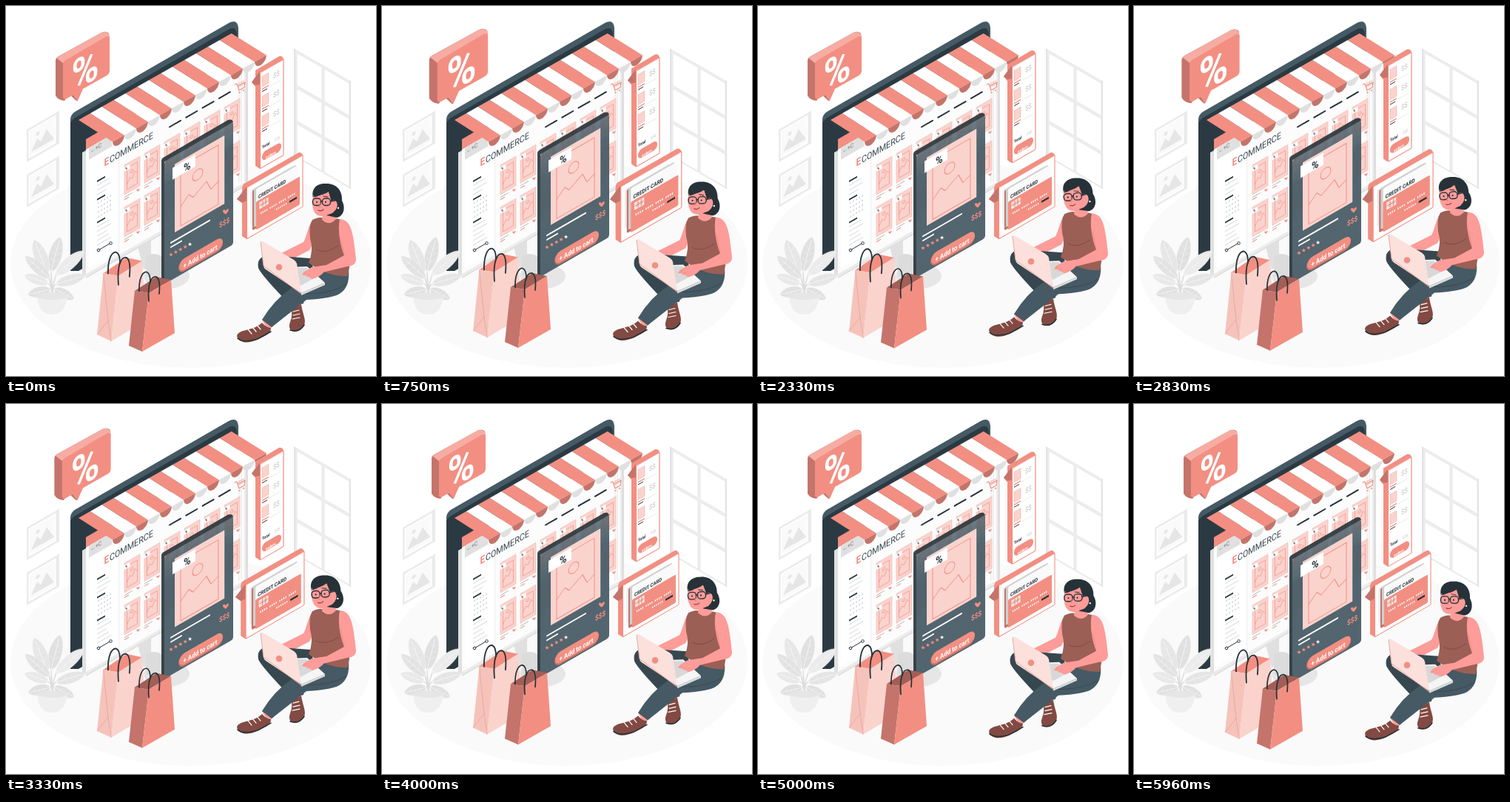
An HTML page for the animation above (6000 ms loop, 500 by 500 pixels).

```html
<!DOCTYPE html>
<html lang="en">
<head>
<meta charset="utf-8">
<title>Online shop</title>
<style>
html, body { margin: 0; width: 100%; height: 100%; overflow: hidden; background: #fff; }
svg { display: block; width: 100%; height: 100%; }
text { font-family: Roboto, Arial, sans-serif; }
</style>
</head>
<body>
<svg id="stage" viewBox="0 0 500 500"></svg>
<script>
const coral = '#f28f82', deep = '#c4746b', blush = '#f7aca3', pink = '#fad3cd', dark = '#263238', slate = '#455a64', skin = '#fd9c99', brown = '#9b5f55';

// Markup helpers
const rep = (n, f) => Array.from({length: n}, (_, i) => f(i)).join('');
const path = (d, fill, more = '') => `<path d="${d}" fill="${fill}" ${more}/>`;
const line = (d, stroke, w = 1) => path(d, 'none', `stroke="${stroke}" stroke-width="${w}" stroke-linecap="round" stroke-linejoin="round"`);
const rect = (x, y, w, h, fill, more = '') => `<rect x="${x}" y="${y}" width="${w}" height="${h}" fill="${fill}" ${more}/>`;
const dot = (x, y, r, fill, more = '') => `<circle cx="${x}" cy="${y}" r="${r}" fill="${fill}" ${more}/>`;
const group = (id, body) => `<g id="${id}">${body}</g>`;
// Isometric wall: x stays in screen pixels and the wall climbs to the right
const wall = (x, y, body) => `<g transform="matrix(1 -.577 0 1 ${x} ${y})">${body}</g>`;
const label = (x, y, size, fill, str, more = '') =>
  `<text transform="matrix(.866 -.5 0 1 ${x} ${y})" font-size="${size}" fill="${fill}" ${more}>${str}</text>`;
const heart = (x, y, s, fill) => path(`M${x},${y + s}C${x - 2 * s},${y} ${x - s},${y - 1.6 * s} ${x},${y - .4 * s}C${x + s},${y - 2 * s} ${x + 2 * s},${y - s} ${x},${y + s}`, fill);
const bold = 'font-weight="700"';

function star(x, y, r, fill) {
  const pts = rep(10, i => {
    const a = i * Math.PI / 5, d = i % 2 ? r * .42 : r;
    return `${(x + d * Math.sin(a)).toFixed(1)},${(y - d * Math.cos(a)).toFixed(1)} `;
  });
  return `<polygon points="${pts}" fill="${fill}"/>`;
}

// Leaf with its stem rising from the pot
function leaf(x, y, tx, ty, w, fill) {
  const dx = tx - x, dy = ty - y, n = Math.hypot(dx, dy), nx = -dy / n * w, ny = dx / n * w;
  const at = (k, s) => `${x + dx * k + s * nx},${y + dy * k + s * ny}`;
  return line(`M63,390Q62,378 ${x},${y}`, '#dcdcdc', 1.4)
    + path(`M${x},${y}C${at(.1, 1)} ${at(.8, 1.1)} ${tx},${ty}C${at(.8, -1.1)} ${at(.1, -1)} ${x},${y}`, fill, 'stroke="#f4f4f4" stroke-width=".6"')
    + line(`M${x},${y}L${at(.9, 0)}`, '#f7f7f7', .9)
    + rep(3, i => line(`M${at(.38 + i * .18, .5)}L${at(.28 + i * .18, 0)}L${at(.38 + i * .18, -.5)}`, '#f2f2f2', .6));
}

const frame = y => wall(28, y, rect(0, 0, 43, 44, '#ebebeb') + rect(2.5, 3, 37, 38, '#fff') + rect(4, 5, 34, 34, '#fafafa')
  + path('M6,34L14,20l5,7L27,15l10,19z', '#e6e6e6') + dot(15, 14, 2.6, '#e6e6e6')) + line(`M71,${y - 25}v44`, '#e0e0e0', 1);

const room = `<ellipse cx="250" cy="348.5" rx="244" ry="140.5" fill="#fafafa"/>`
  + `<g transform="matrix(1 .577 0 1 389 57)">${rect(0, 0, 77, 146, '#ededed') + rect(0, 0, 2, 146, '#e2e2e2') + rect(75.5, 0, 1.5, 146, '#e2e2e2')
    + rep(6, i => rect(4 + (i % 2) * 37, 4 + (i >> 1) * 48, 34, 44, '#fff', 'stroke="#e6e6e6" stroke-width=".8"'))}</g>`
  + frame(167) + frame(228);

const plant = leaf(61, 359, 73, 312, 11, '#e0e0e0') + leaf(56, 361, 38, 316, 11, '#e6e6e6')
  + leaf(59, 368, 26, 338, 9, '#e2e2e2') + leaf(68, 363, 105, 331, 10, '#ebebeb')
  + leaf(57, 375, 25, 364, 8, '#e8e8e8') + leaf(68, 376, 107, 364, 9, '#e4e4e4')
  + leaf(60, 383, 30, 390, 9, '#e0e0e0') + leaf(65, 382, 92, 396, 8, '#e0e0e0')
  + path('M42,392q2,25 20,25t21,-25z', '#efefef') + `<ellipse cx="62.5" cy="392" rx="20.5" ry="5" fill="#e6e6e6"/>`;

// Monitor with the shop page
const product = (x, y) => wall(x, y, rect(0, 0, 21, 40, pink, 'stroke="#f5b5ac" stroke-width=".5"')
  + rect(3.5, 6, 14, 29, 'none', `stroke="${coral}" stroke-width=".6"`)
  + path('M3.5,28l4,-7 3,3 4,-8 3,5', 'none', `stroke="${coral}" stroke-width=".6"`) + dot(10, 14, 2, 'none', `stroke="${coral}" stroke-width=".6"`)
  + rect(-.5, 3, 8, 6, '#fff') + rect(0, 43, 11, 1.2, '#bdbdbd') + rect(0, 46, 6, 1.2, coral))
  + label(x + 1, y + 7, 5, dark, '%', bold) + heart(x + 18.5, y + 34, 1.8, coral);

const stand = `<ellipse cx="217" cy="365" rx="31" ry="17" fill="#e6e6e6"/>`
  + path('M176,318L196,306V352L186,356Z', '#e0e0e0') + path('M188,340Q200,330 212,340V366H190Z', '#dcdcdc');

// Sidebar rows: headings are short and dark, the middle rows are dotted ratings
const sidebar = rep(15, i => {
  const head = [0, 4, 9].includes(i);
  if (i > 4 && i < 9) return rep(5, k => dot(2 + k * 4, i * 6.2, 1, '#d0d0d0'));
  return rect(0, i * 6.2, head ? 11 : 13 + i % 3 * 3, head ? 2 : 1, head ? dark : '#d6d6d6');
});

const monitor = path('M87,358V154Q87,147 93,143L301,23Q313,17 314,30V237Z', slate)
  + path('M87,358V159Q88,154 95,150L302,31Q311,27 312,38V236L98,358Z', '#2b3a42')
  + wall(103, 190, rect(0, 8, 8, 169, '#e0e0e0'))
  + wall(108, 186, rect(0, 0, 219, 182, '#dedede') + rect(0, 0, 216, 180, '#ececec') + rect(0, 0, 214, 176, '#fcfcfc')
    + rect(4, 18, 40, 152, '#fff') + rect(44, 18, .8, 154, '#ebebeb')
    + line('M207,20V172M210,20V172', '#e2e2e2', .7) + rect(0, -6, 32, 14, coral) + rect(4, 8, 31, 16, '#e0e0e0'))
  + label(114, 199, 8, '#757575', '←+C')
  + label(132.5, 217, 14, coral, 'E', bold) + label(140, 212.5, 12.4, '#37474f', 'COMMERCE')
  + rep(4, i => line(`M${221 + 22.3 * i},${163.5 - 12.9 * i}l15,-8.6`, dark, 2))
  + line('M309,106l3,-1 3,9 7,-4 1,-7 -10,5', coral, 1.2) + line('M314,105l8,-4M315,109l7,-4', coral, .7) + dot(315.5, 117, 1.1, coral) + dot(321, 114, 1.1, coral)
  + wall(123, 236, sidebar)
  + line('M125,330l17,-10', dark, 1) + dot(125, 330, 1.8, '#fff', `stroke="${dark}"`) + dot(141.5, 320.5, 1.8, '#fff', `stroke="${dark}"`)
  + rep(12, i => product(160 + 27 * (i % 6), 215 - 15.6 * (i % 6) + (i > 5 ? 57 : 0)));

const awning = rep(13, i => {
  const top = [98 + 15.9 * i, 154 - 9 * i], low = [144 + 16 * i, 183.5 - 9 * i];
  return path(`M${top}l15.9,-9L${low[0] + 16},${low[1] - 9}L${low}z`, i % 2 ? '#fff' : coral)
    + path(`M${low}c1,12 15,3 16,-9z`, i % 2 ? '#e0e0e0' : deep);
});

const phone = '<linearGradient id="glass" x2="0" y2="1"><stop stop-color="#4a5d67" stop-opacity=".8"/><stop offset=".2" stop-color="#4a5d67" stop-opacity=".95"/></linearGradient>'
  + path('M210,209Q210,206 214,204L300,154Q306,152 307,157L214,210.5V376L210,373Z', dark, 'opacity=".9"')
  + wall(214, 210, rect(0, 0, 93, 166, 'url(#glass)', 'rx="3"')
    + rect(14, 12, 67, 92, pink) + path('M14,12h67v92', 'none', 'stroke="#fff" stroke-opacity=".5" stroke-width=".6"')
    + rect(22, 20, 51, 80, 'none', `stroke="${coral}"`) + dot(45, 44, 7, 'none', `stroke="${coral}"`)
    + line('M22,74L33,64L39,71L57,60L63,74L73,69', coral, 1)
    + rect(11, 15, 31, 16, '#fff') + rect(8, 114, 54, 2.2, '#fff', 'rx="1"') + rect(8, 120, 16, 2, '#fff', 'rx="1"')
    + rect(19, 147, 60, 17, deep, 'rx="8.5"') + rect(20, 146.5, 59, 15.5, coral, 'rx="7.7"'))
  + label(240, 225, 15, dark, '%', bold) + heart(297, 278, 3.4, coral) + label(288, 300, 9.5, coral, '$$$', bold)
  + rep(5, i => star(223 + 6.4 * i, 336 - 3.5 * i, 2.9, i < 4 ? coral : '#f5f5f5'))
  + label(239.5, 355, 9.2, '#fff', '+ Add to cart', bold);

const bag = (x, y, front, side, inner) => `<g transform="translate(${x} ${y})">`
  + path('M8,27L37,8L57,12L27,30Z', inner) + line('M14,30C13,9 19,1 24,1.5Q29,3 29,15', dark, 1.7)
  + path('M8,27L27,30L18,109L0,101Z', side) + path('M27,30L57,12L62,84L18,109Z', front)
  + line('M18,109L14,84L8,27M14,84L0,101', deep, .3)
  + line('M27,41C25,15 31,7 37,8Q43,11 41,31', dark, 1.7) + '</g>';
const bags = `<g transform="translate(123 331)scale(1.07 1.12)translate(-123 -331)">${bag(123, 331, pink, '#f6c3bb', coral)}</g>` + bag(166, 358, coral, deep, '#a35e56');

const offer = path('M67,74Q67,70 71,68L129,36Q135,33 139,37L140,44L79,128Q70,127 67,121Z', deep)
  + path('M68,70L129,36Q135,33 139,38L140,46L78,78Z', blush)
  + path('M77,79Q77,75 81,73L134,42Q140,39 140,46V87Q140,92 136,94L104,112L97,128L91,120L82,125Q77,128 77,122Z', coral)
  + path('M97,128L91,120L88,121.5L95,128Z', deep)
  + label(107, 106.5, 58, '#fff', '%', bold + ' text-anchor="middle"');

const basket = path('M337,87L369,68Q374,67 375,72L343,90V220L337,216V109L332,103L337,96Z', coral)
  + path('M343,88L332,103L337,107L343,106Z', deep)
  + wall(343, 90, rect(.5, .5, 31.5, 129.5, '#fff', `stroke="${coral}" stroke-width="1.2" rx="1"`)
    + rep(3, i => rect(3, 7 + 27 * i, 9, 14, pink, `stroke="${coral}" stroke-width=".3"`) + rect(3, 23.5 + 27 * i, 9, 1.5, coral) + rect(3, 27 + 27 * i, 7, 1, dark)
      + rect(13, 26 + 27 * i, 15, .6, '#ddd'))
    + rect(3, 110, 26, 12, coral, 'rx="5.5"'))
  + rep(3, i => label(361, 98 + 26 * i, 9, '#c4c4c4', '$$')) + label(346, 193, 5.5, dark, 'Total', bold) + label(363, 183, 5, '#c4c4c4', '$$$')
  + label(351, 207, 5.5, '#fff', 'orders', bold);

const card = path('M319,247Q319,242 322,240L396,198Q400,198 401,203L325,315L319,311V266L312,261L319,254Z', coral)
  + path('M320,242L396,198Q400,198 401,202L325,246Z', coral) + path('M325,244L312,261L319,266L325,263Z', deep)
  + wall(325, 245, rect(.5, .5, 75.5, 69.5, '#fff', `stroke="${coral}" stroke-width="1.1" rx="1"`)
    + rect(5.5, 7, 56, 48, '#ebebeb', 'rx="2"') + rect(8, 9, 56, 54, deep, 'rx="2"') + rect(10, 8, 57, 52, '#cfcfcf', 'rx="2"')
    + rect(13, 10, 57, 30, '#fafafa', 'rx="2"') + rect(13, 27, 59, 38, coral, 'rx="1.5"')
    + rect(18, 31, 11, 8, pink, 'stroke="#fff"') + line('M18,35h11M22,31v8M26,31v8', deep, .6)
    + rep(16, i => rect(19 + i * 2.6 + (i >> 2) * 2, 45, 1.3, 2.4, '#fff')) + rect(58, 52, 10, 2.4, dark) + rep(6, i => rect(40 + i * 2.6, 52, 1.3, 2, '#fff')))
  + label(341, 260.5, 6.9, dark, 'CREDIT CARD', bold);

// Shopper
const shoe = (d, laces, sole) => path(d, '#824a42') + line(laces, '#fff', 1.2) + line(sole, dark, 1.6);
const lens = x => rect(x - 5.5, 260, 11, 9.5, 'none', `rx="4" stroke="${dark}" stroke-width="1.4"`);
const head = path('M415,259C412,246 421,239 433,240C447,240 455,250 454,263C459,272 457,284 447,286L434,283Z', dark)
  + path('M415,256Q412,270 417,279Q422,286 432,283L441,280Q450,273 447,265Q443,260 440,264L436,251Q427,257 415,256Z', skin)
  + path('M414.5,258Q422,258 436,250L440,265L444,250L430,243Z', dark)
  + lens(420) + lens(433) + line('M425.5,264h2M438.5,264l6,-1', dark, 1.3) + dot(420, 265, 1.1, dark) + dot(432, 265, 1.1, dark)
  + line('M425,266l-2,5 2,.5', '#dd7a75', .9) + line('M422,276q4,2 7,-1', '#9e3f42', 1.2) + line('M417,257.5l4,-1M429,257l6,1', dark, 1) + dot(449, 273, 1.2, '#fff');

const shopper = path('M412,293C408,300 406,312 402,319L372,334L381,345L410,330L422,306Z', skin)
  + path('M412,341L356,337Q338,338 341,354Q345,364 386,406L402,402L404,386L394,376L418,368Z', '#37474f')
  + path('M385,401L398,398L399,408L387,410Z', skin)
  + shoe('M385,405Q392,409 399,403C401,418 407,425 402,433Q395,442 386,439Q381,435 384,427Q388,418 385,405Z', 'M388,413l8,-2M388,418l9,-2M387,423l10,-2', 'M403,431Q396,442 384,438')
  + path('M346,424L353,420L362,432L354,438Z', skin)
  + path('M463,357Q465,379 452,388Q443,395 406,397L359,434L346,424Q362,397 386,381L412,358Z', slate) + line('M459,377Q440,389 405,389', '#37474f', .8)
  + shoe('M312,446C314,436 334,440 346,428Q352,435 358,435C358,443 350,446 341,450C328,457 315,456 312,446Z', 'M327,437l5,6M333,434l5,6M339,431l5,6', 'M313,449Q320,456 340,450L358,440')
  + path('M414,289Q427,283 430,288Q437,296 444,287Q461,288 466,306Q468,336 462,365Q434,366 409,347Q416,330 411,314Q409,296 414,289Z', brown)
  + path('M429,276L444,274L446,288Q437,298 427,289Z', skin) + line('M419,329Q432,336 449,324', '#7c473f', .8)
  + path('M451,288C466,289 469,303 473,342Q473,351 461,352L428,360Q417,370 406,367L399,362L413,353L433,350L457,337C451,322 448,302 451,288Z', skin)
  + line('M457,337Q455,325 452,313', '#e78580', .7)
  + path('M380,353L407,352L431,374L399,388Z', '#f5f5f5') + path('M386,354L406,354L420,366L398,378Z', '#d8d8d8') + path('M399,388L431,374V377L399,391Z', '#dcdcdc')
  + path('M344,319Q344,317 347,318L389,343Q392,345 393,348L399,388L351,356Q348,354 348,351Z', '#fbe0dc') + line('M344,319L348,351L399,389', '#e5aaa3', 1)
  + dot(369, 353, 4.3, coral)
  + path('M428,351L412,354Q401,359 400,363L407,365L414,369Q425,366 430,359Z', skin) + line('M406,359l-4,4M410,362l-3,4', '#e78580', .7)
  + group('head', head);

const stage = document.getElementById('stage');
stage.innerHTML = room + stand + monitor + awning + plant + group('phone', phone) + group('bags', bags)
  + group('offer', offer) + group('basket', basket) + group('card', card) + group('shopper', shopper);

// Motion
const move = (id, value) => document.getElementById(id).setAttribute('transform', value);
const tri = (t, period) => 1 - Math.abs(1 - 2 * (t % period) / period);
const lift = (id, t, period) => move(id, `translate(0 ${-10 * tri(t, period)})`);
const pulse = (id, s, x, y) => move(id, `translate(${x} ${y})scale(${s})translate(${-x} ${-y})`);
const beats = [[0, 1], [600, 1.1], [1800, 1], [2400, 1], [3000, 1.1], [3600, 1], [6000, 1]];

function beat(t) {
  const i = beats.findIndex(b => b[0] > t), [t0, a] = beats[i - 1], [t1, b] = beats[i];
  return a + (b - a) * (t - t0) / (t1 - t0);
}

const start = performance.now();
function draw() {
  const t = (performance.now() - start) % 6000, s = beat(t);
  lift('phone', t, 1500);
  lift('bags', t, 3000);
  lift('basket', t, 6000);
  lift('shopper', t, 6000);
  move('head', `rotate(${-6 * tri(t, 6000)} 436 280)`);
  pulse('offer', s, 103.5, 81);
  pulse('card', s, 358, 259);
  requestAnimationFrame(draw);
}
draw();
</script>
</body>
</html>
```
